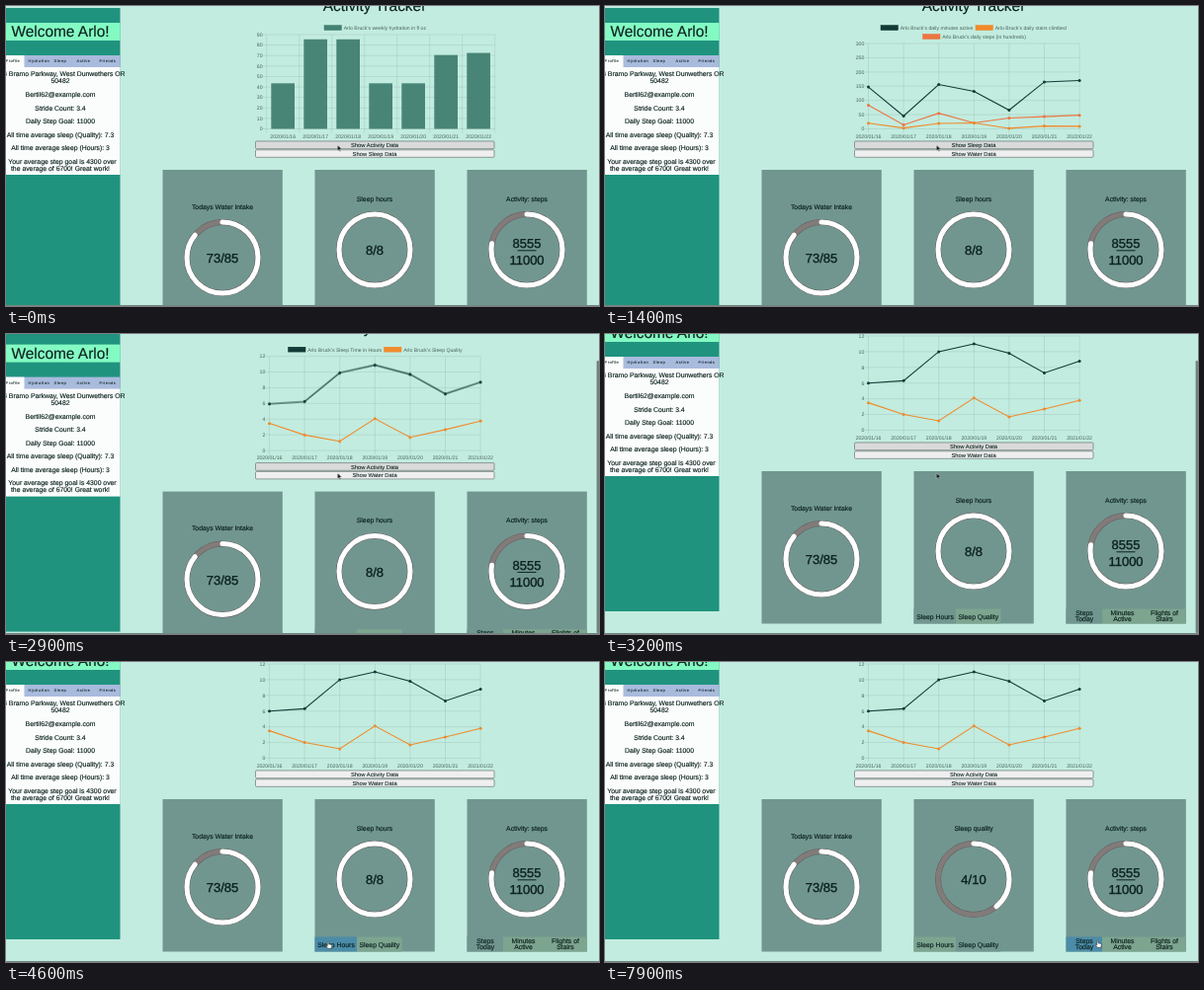
An HTML page for the animation above (8000 ms loop, 600 px wide and 304 px high).

```html
<!DOCTYPE html>
<html lang="en">
<head>
<meta charset="utf-8">
<title>Activity Tracker</title>
<style>
  html, body { margin: 0; width: 100%; height: 100%; overflow: hidden; background: #c2ecdf; }
  svg { display: block; width: 600px; height: 304px; }
  text {
    font-family: "Liberation Sans", Arial, sans-serif; font-size: 6.85px;
    fill: #0b211e; stroke: #0b211e; stroke-width: .15px; text-rendering: geometricPrecision;
  }
  .big { font-size: 15.45px; }
  .num { font-size: 13px; stroke-width: .35px; }
  .nav { font-size: 4px; letter-spacing: .5px; stroke-width: .05px; }
  .btn { font-size: 5.8px; stroke-width: .08px; }
  .small { font-size: 5.15px; fill: #47625b; stroke: none; }
  .mid { text-anchor: middle; }
  .end { text-anchor: end; }
  .grid { stroke: #000; stroke-opacity: .13; stroke-width: .6; fill: none; }
  .line { fill: none; stroke-width: 1.1; vector-effect: non-scaling-stroke; transform-origin: 0 124.5px; }
  .button { fill: #efefef; stroke: #6d7573; stroke-width: .7; }

  #page, #bar, #cursor, #arrow, #hand, .step, .line, .dot, #sleepArc { animation: 8s linear infinite; }
  .step, #arrow, #hand { animation-timing-function: step-end; }

  #page { animation-name: scroll; }
  @keyframes scroll {
    0%, 35% { transform: none; animation-timing-function: ease-in-out; }
    38.75%, 100% { transform: translateY(-27px); }
  }
  #bar { animation-name: bar; }
  @keyframes bar { 0%, 35% { opacity: 0; } 35.5%, 46.5% { opacity: 1; } 49.5%, 100% { opacity: 0; } }

  #bars { animation-name: bars; }
  #activity { animation-name: activity; }
  #sleep { animation-name: sleep; }
  @keyframes bars { 0% { visibility: visible; } 1.5%, 100% { visibility: hidden; } }
  @keyframes activity { 0% { visibility: hidden; } 1.5% { visibility: visible; } 27.375%, 100% { visibility: hidden; } }
  @keyframes sleep { 0% { visibility: hidden; } 27.375%, 100% { visibility: visible; } }

  #activity .line { animation-name: growActivity; }
  #activity .dot { animation-name: riseActivity; }
  #sleep .line { animation-name: growSleep; }
  #sleep .dot { animation-name: riseSleep; }
  @keyframes growActivity {
    0%, 1.5% { transform: scaleY(.001); animation-timing-function: cubic-bezier(.25, 1, .5, 1); }
    14%, 100% { transform: none; }
  }
  @keyframes riseActivity {
    0%, 1.5% { transform: translateY(var(--h)); animation-timing-function: cubic-bezier(.25, 1, .5, 1); }
    14%, 100% { transform: none; }
  }
  @keyframes growSleep {
    0%, 27.44% { transform: scaleY(.001); animation-timing-function: cubic-bezier(.25, 1, .5, 1); }
    39.94%, 100% { transform: none; }
  }
  @keyframes riseSleep {
    0%, 27.44% { transform: translateY(var(--h)); animation-timing-function: cubic-bezier(.25, 1, .5, 1); }
    39.94%, 100% { transform: none; }
  }

  #topButton { animation-name: topButton; }
  @keyframes topButton { 0% { fill: #d9dbda; } 42%, 100% { fill: #efefef; } }

  .before { animation-name: before; }
  .after { animation-name: after; }
  @keyframes before { 0% { visibility: visible; } 65%, 100% { visibility: hidden; } }
  @keyframes after { 0% { visibility: hidden; } 65%, 100% { visibility: visible; } }
  #sleepArc { animation-name: arc; }
  @keyframes arc {
    0%, 65% { stroke-dashoffset: 0; animation-timing-function: ease; }
    71.25%, 100% { stroke-dashoffset: 61; }
  }

  .tab { fill: #7da48f; }
  #hoursTab { animation-name: hoursTab; }
  #qualityTab { animation-name: qualityTab; }
  #stepsTab { animation-name: stepsTab; }
  @keyframes hoursTab { 0% { fill: #719690; } 52.5% { fill: #4c8ca8; } 60.4% { fill: #719690; } 65%, 100% { fill: #7da48f; } }
  @keyframes qualityTab { 0% { fill: #7da48f; } 60.4% { fill: #4c8ca8; } 68.8%, 100% { fill: #719690; } }
  @keyframes stepsTab { 0% { fill: #719690; } 76.25%, 100% { fill: #4c8ca8; } }

  #cursor { animation-name: move; }
  @keyframes move {
    0%, 46.25% { transform: translate(335.5px, 141px); animation-timing-function: ease-in-out; }
    53.75%, 58.125% { transform: translate(323.5px, 283px); animation-timing-function: ease-in-out; }
    62.5%, 67.5% { transform: translate(374px, 283px); animation-timing-function: ease-in-out; }
    72.5%, 74.375% { transform: translate(495px, 294.5px); animation-timing-function: ease-in-out; }
    78.125%, 100% { transform: translate(496px, 282px); }
  }
  #arrow { animation-name: arrow; }
  #hand { animation-name: hand; }
  @keyframes arrow { 0% { opacity: 1; } 52.5% { opacity: 0; } 68.8% { opacity: 1; } 76.25%, 100% { opacity: 0; } }
  @keyframes hand { 0% { opacity: 0; } 52.5% { opacity: 1; } 68.8% { opacity: 0; } 76.25%, 100% { opacity: 1; } }
</style>
</head>
<body>
<svg viewBox="0 0 600 304">
  <rect width="600" height="304" fill="#c2ecdf"/>
  <g id="page">
    <g id="profile">
      <rect y="2" width="115.5" height="306" fill="#1f937e"/>
      <rect y="17" width="115.5" height="18" fill="#84fac3"/>
      <text class="big mid" x="55" y="31.3">Welcome Arlo!</text>
      <rect y="50" width="115.5" height="12.5" fill="#a9bbdd"/>
      <rect y="50" width="18.5" height="12.5" fill="#fbfdfc"/>
      <rect y="62" width="115.5" height="109" fill="#fbfdfc"/>
      <text class="nav" x="-.5" y="57.4">Profile</text>
      <text class="nav" x="22.5" y="57.4">Hydration</text>
      <text class="nav" x="48.5" y="57.4">Sleep</text>
      <text class="nav" x="71.5" y="57.4">Active</text>
      <text class="nav" x="94.5" y="57.4">Friends</text>
    </g>

    <text class="big mid" x="373" y="5">Activity Tracker</text>
    <g id="bars" class="step"></g>
    <g id="activity" class="step"></g>
    <g id="sleep" class="step"></g>

    <rect id="topButton" class="button step" x="252.5" y="137" width="241.5" height="7.7" rx="1"/>
    <rect class="button" x="252.5" y="145.8" width="241.5" height="7.5" rx="1"/>
    <g id="labels"></g>

    <g id="cards"></g>
    <rect id="hoursTab" class="step" x="312.5" y="305.5" width="42.5" height="15"/>
    <rect id="qualityTab" class="step" x="355" y="305.5" width="45.5" height="15"/>
    <rect id="stepsTab" class="step" x="466.5" y="305.5" width="36.5" height="15"/>
    <rect class="tab" x="503" y="305.5" width="41" height="15"/>
    <rect class="tab" x="544" y="305.5" width="44" height="15"/>
    <g id="tabText"></g>
  </g>

  <rect y="303" width="600" height="1" fill="#71877f"/>
  <rect id="bar" x="597.6" y="27" width="2.4" height="276" rx="1" fill="#71817c"/>
  <g id="cursor">
    <path id="arrow" d="M0 0V5.6L1.3 4.4L2.2 6.4L3.1 6L2.2 4.1H4Z" fill="#0a0a0a" stroke="#e8f3ef" stroke-width=".35"/>
    <path id="hand" d="M1.8 .6Q2.5 -.1 3.1 .6V2.8L5.8 3.4Q6.5 3.6 6.4 4.4L5.8 7.4H2.4L.3 4.8Q.3 3.9 1.8 4.6Z" fill="#fff" stroke="#17272b" stroke-width=".6"/>
  </g>
</svg>
<script>
  const NS = 'http://www.w3.org/2000/svg';
  const BASE = 124.5;
  const NAME = "Arlo Bruck's ";
  const DARK = '#123a36', ORANGE = '#f08a2b', CORAL = '#ed7442', GREEN = '#438173';
  const $ = id => document.getElementById(id);

  function add(parent, tag, attrs, text) {
    const el = document.createElementNS(NS, tag);
    for (const key in attrs) el.setAttribute(key, attrs[key]);
    if (text !== undefined) el.textContent = text;
    return parent.appendChild(el);
  }
  const put = (g, x, y, text, cls = 'mid') => add(g, 'text', { x, y, class: cls }, text);

  function axes(g, xs, left, right, top, max, step, labelXs, lastYear) {
    let d = '';
    for (const x of xs) d += `M${x} ${top}V${BASE + 4}`;
    for (let v = 0; v <= max; v += step) {
      const y = BASE - v / max * (BASE - top);
      d += `M${left - 4} ${y}H${right}`;
      put(g, left - 4.2, y + 1.8, v, 'small end');
    }
    add(g, 'path', { d, class: 'grid' });
    labelXs.forEach((x, i) => put(g, x, 133.6, `${i < 6 ? 2020 : lastYear}/01/${16 + i}`, 'small mid'));
  }

  function legend(g, x, y, color, label) {
    add(g, 'rect', { x, y: y - 2.5, width: 17.5, height: 5, fill: color, stroke: color, 'stroke-width': .5 });
    put(g, x + 19.7, y + 1.9, NAME + label, 'small');
  }

  function series(g, xs, top, max, color, values) {
    const ys = values.map(v => BASE - v / max * (BASE - top));
    add(g, 'path', { d: 'M' + xs.map((x, i) => `${x} ${ys[i]}`).join('L'), class: 'line', stroke: color });
    xs.forEach((x, i) => add(g, 'circle', {
      cx: x, cy: ys[i], r: 1.5, fill: color, class: 'dot', style: `--h:${BASE - ys[i]}px`
    }));
  }

  const days = [0, 1, 2, 3, 4, 5, 6];
  const points = days.map(i => 266.5 + 35.6 * i);

  const bars = $('bars');
  const edges = [...days, 7].map(i => 263.7 + 33 * i);
  axes(bars, edges, 263.7, 494.7, 29, 90, 10, days.map(i => 280.2 + 33 * i), 2020);
  [43.5, 85.5, 85.5, 43.5, 43.5, 70.5, 72.5].forEach((v, i) => {
    const height = v / 90 * (BASE - 29);
    add(bars, 'rect', { x: edges[i] + 4.6, y: BASE - height, width: 23.7, height, fill: GREEN, 'fill-opacity': .96 });
  });
  legend(bars, 322, 22, GREEN, 'weekly hydration in fl oz');

  const activity = $('activity');
  axes(activity, points, 266.5, 480.1, 38, 300, 50, points, 2022);
  series(activity, points, 38, 300, CORAL, [83, 14, 55, 21, 38, 43, 48]);
  series(activity, points, 38, 300, ORANGE, [20, 3, 19, 21, 2, 10, 9]);
  series(activity, points, 38, 300, DARK, [147, 45, 156, 132, 66, 165, 170]);
  legend(activity, 279, 22, DARK, 'daily minutes active');
  legend(activity, 375, 22, ORANGE, 'daily stairs climbed');
  legend(activity, 321.5, 31, CORAL, 'daily steps (in hundreds)');

  const sleep = $('sleep');
  axes(sleep, points, 266.5, 480.1, 29, 12, 2, points, 2021);
  series(sleep, points, 29, 12, ORANGE, [3.5, 2, 1.2, 4.1, 1.7, 2.7, 3.8]);
  series(sleep, points, 29, 12, DARK, [6, 6.3, 10, 11, 9.8, 7.3, 8.8]);
  legend(sleep, 285.5, 22, DARK, 'Sleep Time in Hours');
  legend(sleep, 382.5, 22, ORANGE, 'Sleep Quality');

  // Button captions follow the chart on show.
  for (const [id, first, second] of [
    ['bars', 'Activity', 'Sleep'], ['activity', 'Sleep', 'Water'], ['sleep', 'Activity', 'Water']
  ]) {
    const g = add($('labels'), 'g', { class: 'step', style: `animation-name:${id}` });
    put(g, 373, 142.9, `Show ${first} Data`, 'btn mid');
    put(g, 373, 151.5, `Show ${second} Data`, 'btn mid');
  }

  [
    [71.2, '274 Bramo Parkway, West Dunwethers OR'], [78.2, '50482'],
    [92, 'Bertil62@example.com'], [105.5, 'Stride Count: 3.4'], [119, 'Daily Step Goal: 11000'],
    [132.5, 'All time average sleep (Quality): 7.3'], [146, 'All time average sleep (Hours): 3'],
    [159.5, 'Your average step goal is 4300 over'], [166.5, 'the average of 6700! Great work!']
  ].forEach(([y, text]) => put($('profile'), text.startsWith('Your') ? 57 : 55, y, text));

  const cards = $('cards');
  function card(cx, cy, percent, id) {
    add(cards, 'rect', { x: cx - 60.5, y: 166, width: 121.3, height: 154.5, fill: '#719690' });
    const ring = (stroke, width, extra) => add(cards, 'circle', {
      cx, cy, r: 36, fill: 'none', stroke, 'stroke-width': width, ...extra
    });
    ring('#655f5d', 6);
    ring('#817b7a', 5);
    ring('#fff', 5, {
      pathLength: 100, 'stroke-dasharray': `${percent} 100`, 'stroke-linecap': 'round',
      transform: `rotate(-90 ${cx} ${cy})`, ...(id && { id })
    });
  }
  card(219, 255, 86);
  card(373, 247, 100, 'sleepArc');
  card(527, 247, 77.8);

  put(cards, 219, 205.7, 'Todays Water Intake');
  put(cards, 219, 260, '73/85', 'num mid');
  put(cards, 373, 197.8, 'Sleep hours', 'mid step before');
  put(cards, 373, 252, '8/8', 'num mid step before');
  put(cards, 373, 197.8, 'Sleep quality', 'mid step after');
  put(cards, 373, 252, '4/10', 'num mid step after');
  put(cards, 527, 197.8, 'Activity: steps');
  put(cards, 527, 245.2, '8555', 'num mid');
  add(cards, 'path', { d: 'M517.5 247.8H536.5', stroke: '#0b211e', 'stroke-width': 1 });
  put(cards, 527, 262, '11000', 'num mid');

  [
    [334, 315.5, 'Sleep Hours'], [377.8, 315.5, 'Sleep Quality'],
    [485, 311.6, 'Steps'], [485, 318.4, 'Today'],
    [523.5, 311.6, 'Minutes'], [523.5, 318.4, 'Active'],
    [566, 311.6, 'Flights of'], [566, 318.4, 'Stairs']
  ].forEach(([x, y, text]) => put($('tabText'), x, y, text));
</script>
</body>
</html>
```
